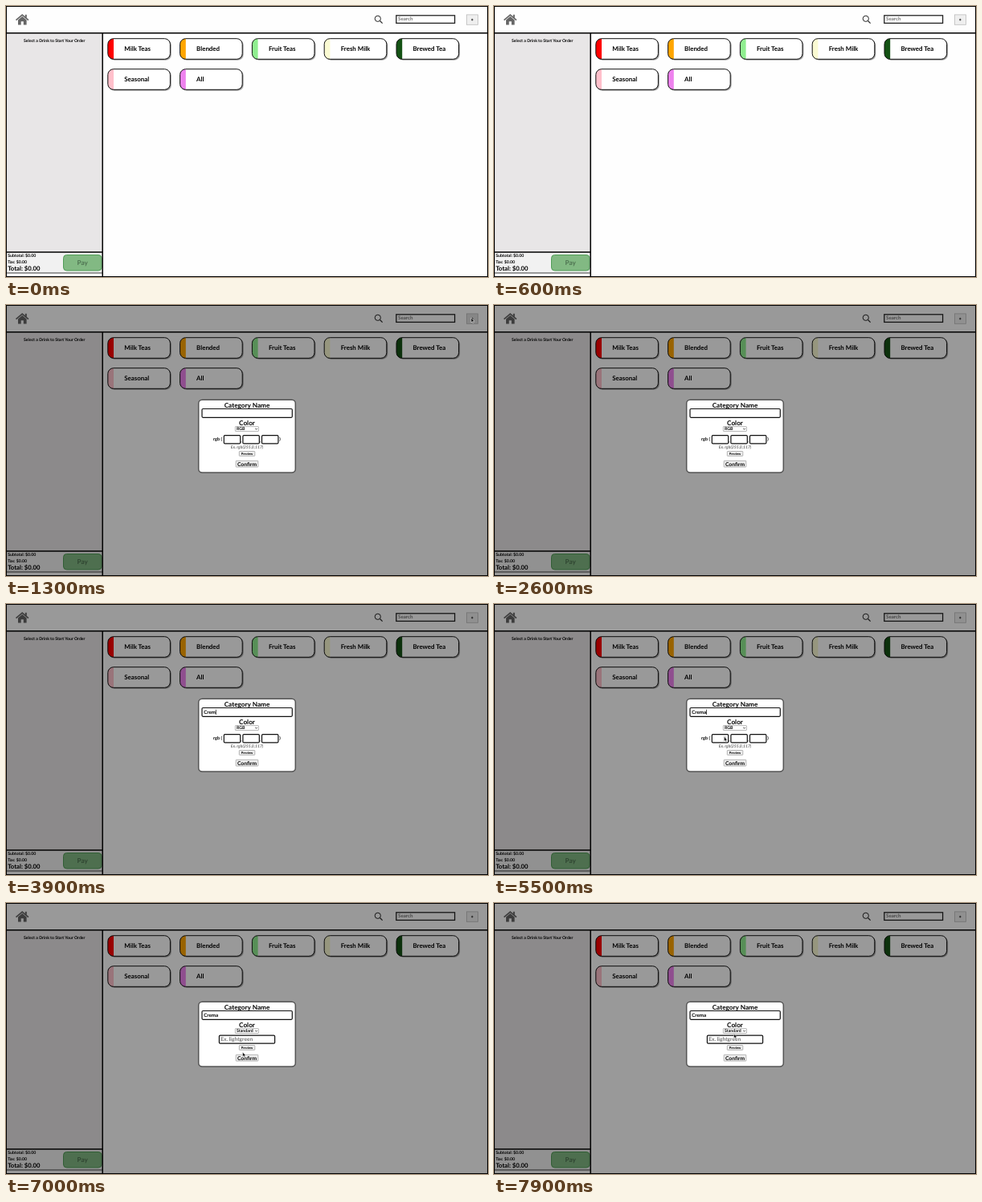
These frames come from a looping animation (600x338 px, 8 s). An HTML page:

```html
<!DOCTYPE html>
<html lang="en">
<head>
<meta charset="utf-8">
<title>Drink order screen</title>
<style>
  html, body { margin: 0; width: 100%; height: 100%; overflow: hidden; background: #fff; }
  svg { display: block; width: 100vw; height: 100vh; }
  text { font-family: Lato, "Open Sans", sans-serif; font-weight: 700; text-rendering: geometricPrecision; white-space: pre; }
</style>
</head>
<body>
<svg id="stage" viewBox="0 0 600 338"></svg>
<script>
const LOOP = 8000, STEP = 100;
const stage = document.getElementById('stage');

function el(parent, tag, attrs = {}, content) {
  const node = document.createElementNS('http://www.w3.org/2000/svg', tag);
  for (const key in attrs) node.setAttribute(key, attrs[key]);
  if (content !== undefined) node.textContent = content;
  parent.append(node);
  return node;
}
const group = (parent) => el(parent, 'g');
const box = (parent, x, y, width, height, fill, more) =>
  el(parent, 'rect', { x, y, width, height, fill, ...more });
const path = (parent, d, more) => el(parent, 'path', { d, fill: 'none', ...more });
const label = (parent, x, y, size, content, more) =>
  el(parent, 'text', { x, y, 'font-size': size, fill: '#000', ...more }, content);
const show = (node, on) => node.setAttribute('display', on ? 'inline' : 'none');
const move = (node, x, y) => node.setAttribute('transform', `translate(${x} ${y})`);
const MID = { 'text-anchor': 'middle' };

// Page: header
const page = group(stage);
box(page, 0, 0, 600, 338, '#fefefe');
const home = group(page);
path(home, 'M12.5 17.6 20.2 11 27.9 17.6', { stroke: '#666', 'stroke-width': 1.7 });
box(home, 23.8, 10.8, 2, 4, '#666');
path(home, 'M15 17.4 20.2 13.1 25.6 17.4V23.5H21.8V19.3H18.7V23.5H15Z', { style: 'fill:#666' });
el(page, 'circle', { cx: 462.8, cy: 15.8, r: 3.6, fill: 'none', stroke: '#222' });
path(page, 'M465.5 18.5 468.6 21.6', { stroke: '#222', 'stroke-width': 1.1 });
box(page, 485.8, 11.8, 72.8, 9.6, '#fff', { stroke: '#222', 'stroke-width': 1.3 });
label(page, 488, 18.2, 6.2, 'Search', { fill: '#757575' });
const addButton = box(page, 573.5, 10.9, 14, 12.4, '#efefef', { stroke: '#bcbcbc', 'stroke-width': 0.8 });
path(page, 'M579 17.1H581.6M580.3 15.8V18.4', { stroke: '#222', 'stroke-width': 0.8 });

// Page: order panel
box(page, 1, 34, 119, 273, '#e8e6e7');
label(page, 60.3, 45, 5.15, 'Select a Drink to Start Your Order', MID);
box(page, 1, 307, 119, 26, '#f1f1f1');
label(page, 2.2, 313, 5.2, 'Subtotal: $0.00');
label(page, 2.2, 320.5, 5.2, 'Tax: $0.00');
label(page, 2.2, 329.6, 7.7, 'Total: $0.00');
box(page, 71.5, 310.5, 47.5, 19.5, '#82b983', { rx: 4, stroke: '#4f9c56' });
label(page, 95.2, 322.9, 8.2, 'Pay', { ...MID, fill: '#4f7452' });
path(page, 'M0 33.8H600M120.2 33V338M0 307H120', { stroke: '#000', 'stroke-width': 1.5 });
path(page, 'M0 333H120', { stroke: '#222', 'stroke-width': 0.9 });
box(page, 0.5, 0.5, 599, 337, 'none', { stroke: '#000' });

// Page: category cards
const categories = [
  ['Milk Teas', '#ff0000'], ['Blended', '#ffa500'], ['Fruit Teas', '#90ee90'],
  ['Fresh Milk', '#fafad2'], ['Brewed Tea', '#145214'], ['Seasonal', '#ffc0cb'], ['All', '#ee82ee']
];
categories.forEach(([name, color], i) => {
  const card = group(page);
  move(card, 126.8 + 89.8 * (i % 5), 40.7 + 38 * Math.floor(i / 5));
  box(card, 1.6, 1.6, 77.6, 25.6, '#888', { rx: 7, opacity: 0.45 });
  box(card, 1, 1, 77.6, 25.6, '#666', { rx: 7, opacity: 0.6 });
  box(card, 0, 0, 77.6, 25.6, '#fff', { rx: 7 });
  path(card, 'M7.2 0H7A7 7 0 0 0 0 7V18.6A7 7 0 0 0 7 25.6H7.2Z', { style: `fill:${color}` });
  box(card, 0, 0, 77.6, 25.6, 'none', { rx: 7, stroke: '#111' });
  label(card, 20.5, 15, 7.9, name);
});

// Dialog
const modal = group(stage);
box(modal, 0, 0, 600, 338, '#000', { opacity: 0.4 });
const frame = box(modal, 239.7, 118.2, 120.6, 90.8, '#fff', { rx: 4.5, stroke: '#555', 'stroke-width': 1.5 });
const BORDER = { rx: 1.2, stroke: '#111', 'stroke-width': 1.2 };
const BUTTON = { rx: 0.5, stroke: '#999', 'stroke-width': 0.7 };

const upper = group(modal);
label(upper, 300, 128, 8.2, 'Category Name', MID);
box(upper, 244, 129.5, 112.3, 10.8, '#fff', BORDER);
const typed = label(upper, 246.2, 136.9, 6.2, '');
const caret = box(upper, 0, 131.6, 0.7, 6.4, '#000');
label(upper, 300, 149.8, 8.2, 'Color', MID);
box(upper, 285.4, 151.6, 29, 5.9, '#fff', BUTTON);
const chosen = label(upper, 287, 156.4, 5.2, 'RGB');
path(upper, 'M310.2 153.9 311.5 155.2 312.8 153.9', { stroke: '#111', 'stroke-width': 0.8 });

const rgbFields = group(modal);
label(rgbFields, 258, 169.2, 5.5, 'rgb (');
for (let i = 0; i < 3; i++) box(rgbFields, 271.3 + 23.6 * i, 162.7, 20.4, 10.2, '#fff', BORDER);
label(rgbFields, 292.3, 171, 5, ',');
label(rgbFields, 315.9, 171, 5, ',');
label(rgbFields, 340.2, 169.2, 5.5, ')');
label(rgbFields, 300, 179, 5.1, 'Ex. rgb(255,0,117)', { ...MID, fill: '#666', 'font-style': 'italic', 'font-weight': 400 });
const spinner = group(rgbFields);
box(spinner, 285, 164.3, 4.6, 7, '#efefef');
path(spinner, 'M286 167 287.3 165.4 288.6 167ZM286 168.6 287.3 170.2 288.6 168.6Z', { style: 'fill:#555' });

const nameField = group(modal);
box(nameField, 265.4, 165.1, 69.2, 10, '#fff', BORDER);
label(nameField, 267.3, 172.2, 6.6, 'Ex. lightgreen', { fill: '#757575' });

const lower = group(modal);
box(lower, 290.3, 182.5, 19.5, 5.8, '#efefef', BUTTON);
label(lower, 300, 186.8, 4.1, 'Preview', MID);
box(lower, 286.2, 194.3, 27.6, 7.8, '#efefef', BUTTON);
label(lower, 300, 200.5, 6.7, 'Confirm', MID);

// Open list
const ROW = 7.55, LIST_TOP = 157.7;
const list = group(modal);
box(list, 285.8, 158.4, 30, 31.2, '#000', { opacity: 0.25 });
box(list, 285.2, 157.7, 29.8, 30.9, '#fff', { stroke: '#777', 'stroke-width': 0.7 });
const bar = box(list, 285.5, LIST_TOP, 29.2, ROW, '#0a63d0');
const options = ['RGB', 'Hex', 'HSL', 'Standard'].map((name, i) =>
  label(list, 287, LIST_TOP + ROW * i + 5.7, 5.3, name));

// Pointer
const pointer = group(stage);
path(pointer, 'M0 0V5.8L1.3 4.6 2.2 6.6 3.2 6.1 2.3 4.2H4.1Z',
  { style: 'fill:#111', stroke: '#fff', 'stroke-width': 0.5 });

const routes = [
  [[1000, 556, 30], [1200, 579, 16], [1400, 579, 16], [1800, 320, 125], [2200, 318, 131], [2300, 318, 131]],
  [[4400, 355, 78], [4600, 355, 78], [5500, 286.5, 165.5], [5700, 301, 164], [5900, 301, 154],
   [6000, 301, 154], [6300, 300, 163], [6600, 296, 185.5], [6800, 294.5, 186], [7000, 294.5, 186],
   [7500, 292, 164.5], [7900, 298.5, 163], [8000, 298.5, 163]]
];

function pointerAt(t) {
  for (const route of routes) {
    for (let i = 1; i < route.length; i++) {
      const [t0, x0, y0] = route[i - 1], [t1, x1, y1] = route[i];
      if (t < t0 || t >= t1) continue;
      const p = (t - t0) / (t1 - t0), k = p * p * (3 - 2 * p);
      return [x0 + (x1 - x0) * k, y0 + (y1 - y0) * k];
    }
  }
  return null;
}

const within = (t, from, to) => t >= from && t < to;
const keyTimes = [2900, 3400, 3500, 3900, 4000];

function render(t) {
  const at = pointerAt(t);
  show(pointer, at);
  if (at) move(pointer, at[0], at[1]);
  addButton.setAttribute('fill', within(t, 1100, 1500) ? '#dedede' : '#efefef');

  show(modal, t >= 1300);
  typed.textContent = 'Crema'.slice(0, keyTimes.filter(k => t >= k).length);
  show(caret, within(t, 2100, 2600) || within(t, 2900, 4500) || within(t, 5000, 5600));
  if (t >= 1300) {
    const width = typed.textContent ? typed.getComputedTextLength() : 0;
    caret.setAttribute('x', 246.1 + width);
  }

  const named = t >= 7000;
  const shift = named ? 5 : 0;
  frame.setAttribute('y', 118.2 + shift);
  frame.setAttribute('height', 90.8 - 2 * shift);
  move(upper, 0, shift);
  move(lower, 0, -shift);
  show(rgbFields, !named);
  show(nameField, named);
  show(spinner, within(t, 5400, 5600));
  chosen.textContent = named ? 'Standard' : 'RGB';

  const open = within(t, 5900, 7000);
  show(list, open);
  if (open) {
    const row = Math.max(0, Math.min(3, Math.floor((at[1] - LIST_TOP) / ROW)));
    bar.setAttribute('y', LIST_TOP + ROW * row);
    options.forEach((node, i) => node.setAttribute('fill', i === row ? '#fff' : '#000'));
  }
}

const start = performance.now();
function tick() {
  const t = (performance.now() - start) % LOOP;
  render(Math.floor(t / STEP) * STEP);
  requestAnimationFrame(tick);
}
tick();
</script>
</body>
</html>
```
